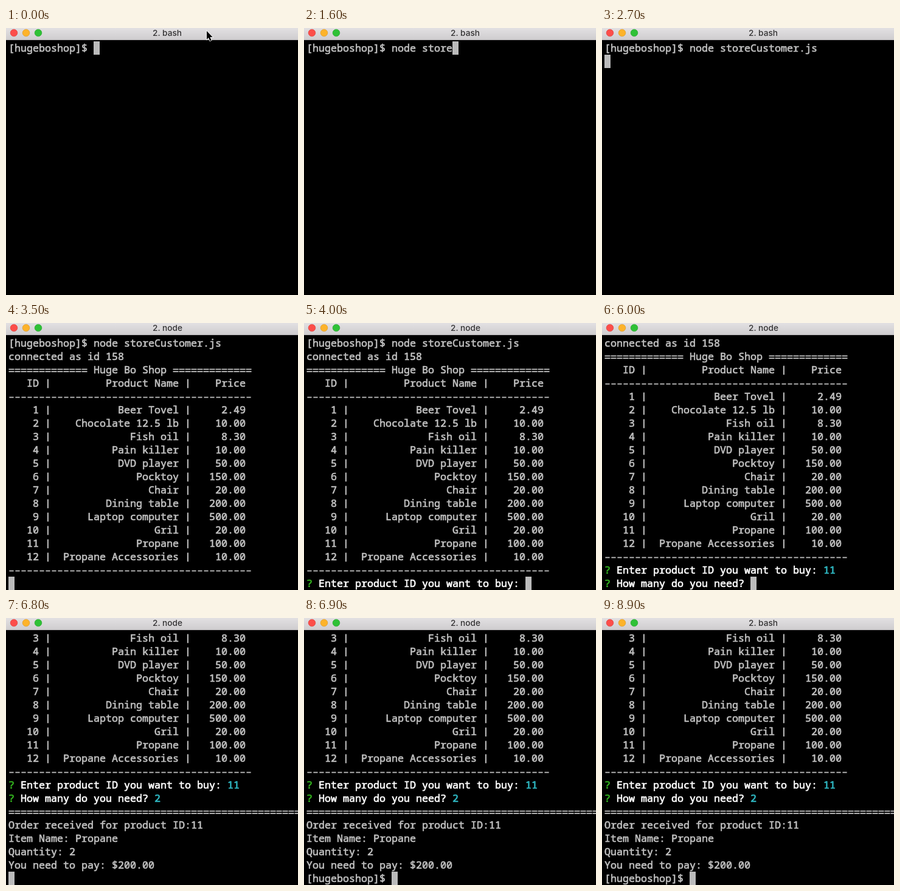
Write an HTML page with a canvas that moves like this. It is 480x440 px and loops after 9600 ms.

```html
<!DOCTYPE html>
<html lang="en">
<head>
<meta charset="utf-8">
<title>Terminal shop</title>
<style>
html, body { margin: 0; width: 100%; height: 100%; overflow: hidden; background: #000; }
canvas { display: block; }
</style>
</head>
<body>
<canvas id="stage" width="480" height="440"></canvas>
<script>
const ctx = document.getElementById('stage').getContext('2d');
const LOOP = 9600, CELL = 10, ROW = 22, LEFT = 4, TOP = 22, ROWS = 19;
const GRAY = '#c0c0c0', WHITE = '#ffffff', GREEN = '#34b41f', CYAN = '#2fb8c3';
const MONO = '500 16.667px "Noto Sans Mono", "DejaVu Sans Mono", monospace';
const PROMPT = '[hugeboshop]$ ';

const products = [
  ['Beer Tovel', '2.49'], ['Chocolate 12.5 lb', '10.00'], ['Fish oil', '8.30'],
  ['Pain killer', '10.00'], ['DVD player', '50.00'], ['Pocktoy', '150.00'],
  ['Chair', '20.00'], ['Dining table', '200.00'], ['Laptop computer', '500.00'],
  ['Gril', '20.00'], ['Propane', '100.00'], ['Propane Accessories', '10.00']
];
const tableRow = (id, name, price) =>
  `${String(id).padStart(5)} |${name.padStart(21)} |${price.padStart(9)}`;
const rule = '-'.repeat(40), edge = '='.repeat(13);
const table = [
  'connected as id 158',
  `${edge} Huge Bo Shop ${edge}`,
  tableRow('ID', 'Product Name', 'Price'),
  rule,
  ...products.map(([name, price], i) => tableRow(i + 1, name, price)),
  rule
];
const receipt = [
  '='.repeat(48),
  'Order received for product ID:11',
  'Item Name: Propane',
  'Quantity: 2',
  'You need to pay: $200.00'
];

// Ruled characters as [x, y, width, height] inside a cell.
const ruled = {
  '|': [[3.9, 4.5, 2, 14.8]],
  '-': [[1.4, 11.6, 7.2, 1.8]],
  '=': [[0.5, 9.4, 9, 1.8], [0.5, 13.2, 9, 1.8]]
};

// Value of the latest step that has begun.
const pick = (t, steps) => steps.filter(([start]) => t >= start).pop()[1];
const plain = text => [[text, GRAY]];
const question = (text, answer, done) =>
  [['? ', GREEN], [text + ' ', WHITE], [answer, done ? CYAN : GRAY]];

// Lines of coloured runs; the cursor follows the last line.
function linesAt(t) {
  const command = pick(t, [[0, ''], [600, 'node'], [700, 'node sto'],
    [1600, 'node store'], [1700, 'node storeCustomer.js ']]);
  const lines = [plain(PROMPT + command)];
  const add = (...texts) => lines.push(...texts.map(plain));

  if (t >= 3500) add(...table);
  if (t >= 3600) {
    const id = pick(t, [[0, ''], [5700, '1'], [5800, '11']]);
    lines.push(question('Enter product ID you want to buy:', id, t >= 5900));
  }
  if (t >= 6000) {
    lines.push(question('How many do you need?', t >= 6200 ? '2' : '', t >= 6700));
  }
  if (t >= 6800) add(...receipt);
  if (t >= 6900) add(PROMPT);
  else if (t >= 6700 || (t >= 5900 && t < 6000) || (t >= 2700 && t < 3600)) add('');
  return lines;
}

function drawChar(char, x, y, color) {
  ctx.fillStyle = ctx.strokeStyle = color;
  if (ruled[char]) {
    for (const [dx, dy, w, h] of ruled[char]) ctx.fillRect(x + dx, y + dy, w, h);
  } else if (char !== ' ') {
    ctx.fillText(char, x, y + 17);
    ctx.strokeText(char, x, y + 17);
  }
}

function drawTerminal(t) {
  ctx.font = MONO;
  ctx.textAlign = 'left';
  ctx.textBaseline = 'alphabetic';
  ctx.lineJoin = 'round';
  ctx.lineWidth = 0.7;
  let x, y;
  linesAt(t).slice(-ROWS).forEach((line, row) => {
    x = LEFT;
    y = TOP + row * ROW;
    for (const [text, color] of line) {
      for (const char of text) {
        drawChar(char, x, y, color);
        x += CELL;
      }
    }
  });
  ctx.fillStyle = '#bbbbbb';
  ctx.fillRect(x, y, CELL, ROW);
}

function drawTitleBar(t) {
  const shade = ctx.createLinearGradient(0, 0, 0, 19);
  shade.addColorStop(0, '#e2e0e2');
  shade.addColorStop(1, '#cfcdcf');
  ctx.fillStyle = shade;
  ctx.fillRect(0, 0, 480, 19);
  ctx.fillStyle = '#b4b2b4';
  ctx.fillRect(0, 19, 480, 1);

  [['#fc4e4a', '#df3d3a'], ['#fdb32a', '#de9a22'], ['#2fc136', '#24a52b']]
    .forEach(([fill, rim], i) => {
      ctx.beginPath();
      ctx.arc(13 + i * 20, 8, 5.8, 0, Math.PI * 2);
      ctx.fillStyle = fill;
      ctx.fill();
      ctx.lineWidth = 0.7;
      ctx.strokeStyle = rim;
      ctx.stroke();
    });

  ctx.font = '500 13.6px Inter, Roboto, sans-serif';
  ctx.textAlign = 'left';
  ctx.textBaseline = 'alphabetic';
  ctx.fillStyle = '#333233';
  ctx.fillText(t >= 3500 && t < 8900 ? '2. node' : '2. bash', 241, 13);
}

function drawPointer() {
  const arrow = new Path2D(
    'M330 5V18.7L333 15.9L335.3 21.2L337.6 20.2L335.3 15H339.6Z');
  ctx.lineJoin = 'miter';
  ctx.lineWidth = 1.6;
  ctx.strokeStyle = '#f4f4f4';
  ctx.stroke(arrow);
  ctx.fillStyle = '#000';
  ctx.fill(arrow);
}

function draw(now) {
  const t = now % LOOP;
  ctx.fillStyle = '#000';
  ctx.fillRect(0, 0, 480, 440);
  drawTerminal(t);
  drawTitleBar(t);
  if (t < 1600) drawPointer();
}

const start = performance.now();
function tick() {
  draw(performance.now() - start);
  requestAnimationFrame(tick);
}
tick();
</script>
</body>
</html>
```
